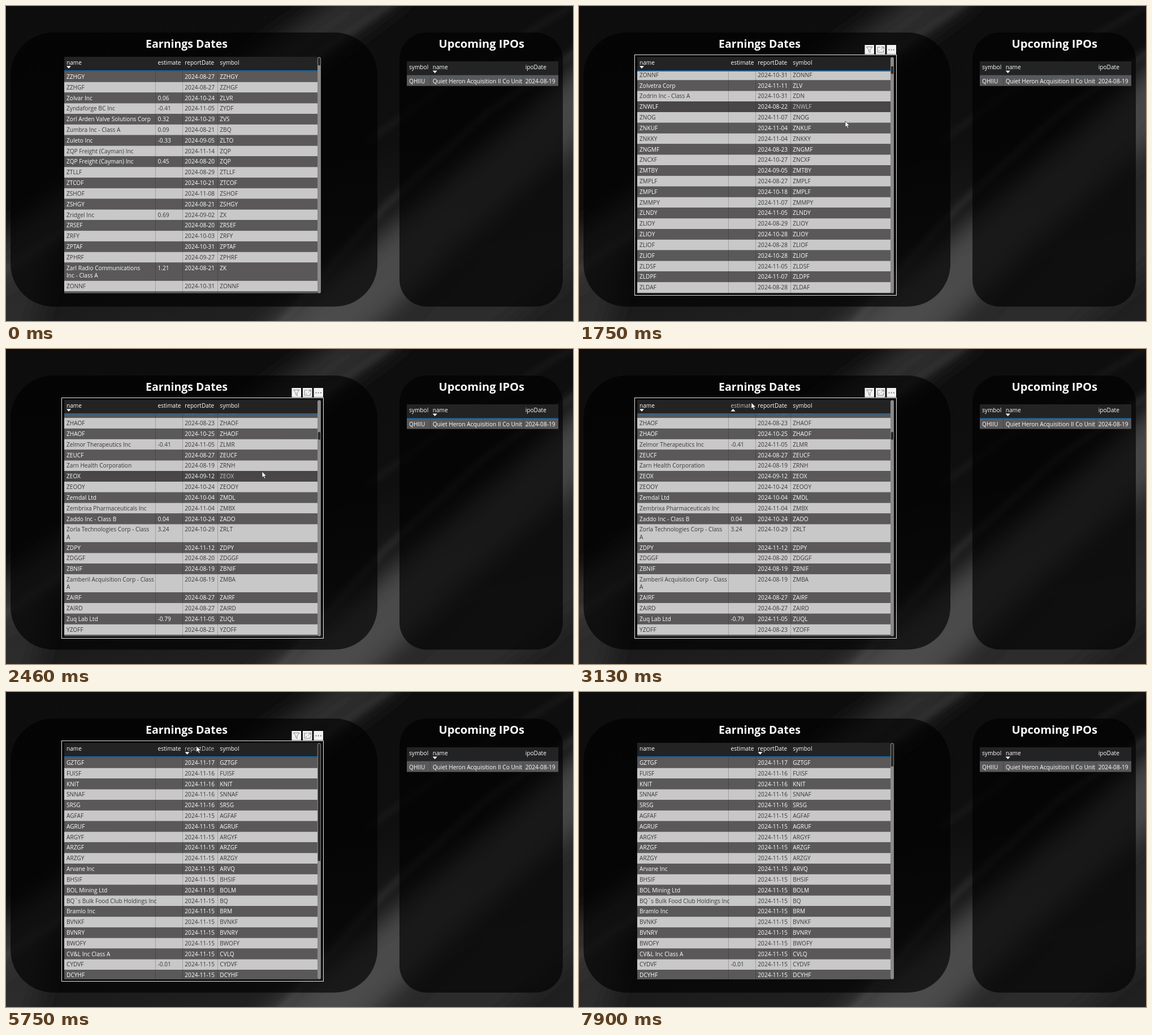
Write an HTML page that moves like this. It is 1003x558 px and loops after 8.15 s.

```html
<!DOCTYPE html>
<html lang="en">
<head>
<meta charset="utf-8">
<title>Earnings Dates</title>
<style>
html, body { margin: 0; width: 100%; height: 100%; overflow: hidden; background: #0c0c0c; }
svg { display: block; width: 1003px; height: 558px; }
text { font: 10.15px "Open Sans", "Noto Sans", sans-serif; fill: #fff; white-space: pre; }
.strong text { font-weight: 500; }
.title { font-weight: 700; text-anchor: middle; }
</style>
</head>
<body>
<svg id="stage" viewBox="0 0 1003 558" xmlns="http://www.w3.org/2000/svg">
  <defs>
    <clipPath id="body"><rect x="103" y="115.4" width="448" height="393.6"/></clipPath>
    <filter id="soft" x="-50%" y="-50%" width="200%" height="200%"><feGaussianBlur stdDeviation="20"/></filter>
    <filter id="fine" x="-50%" y="-50%" width="200%" height="200%"><feGaussianBlur stdDeviation="6"/></filter>
    <linearGradient id="base" x1="0" y1="0" x2="0.35" y2="1">
      <stop offset="0" stop-color="#0d0d0d"/>
      <stop offset="0.6" stop-color="#0f0f0f"/>
      <stop offset="1" stop-color="#202020"/>
    </linearGradient>
  </defs>
  <rect width="1003" height="558" fill="url(#base)"/>
  <g filter="url(#soft)">
    <path d="M600 -30H720L360 240L-40 520V430Z" fill="#3a3a3a" opacity=".75"/>
    <path d="M1060 60L1040 220L780 450L600 620H400L650 420L860 240Z" fill="#5a5a5a" opacity=".75"/>
    <path d="M-30 470L90 440L40 600H-30Z" fill="#3c3c3c" opacity=".5"/>
    <path d="M1040 230V440L820 620H640Z" fill="#3a3a3a" opacity=".5"/>
  </g>
  <g filter="url(#fine)" stroke="#777" fill="none">
    <path d="M1020 -12L820 110L640 240" stroke-width="5" opacity=".18"/>
    <path d="M1020 72L850 190L670 355L470 580" stroke-width="7" opacity=".3"/>
    <path d="M690 -10L500 120L260 290L-20 480" stroke-width="10" opacity=".22"/>
  </g>
  <g fill="#000" fill-opacity=".66">
    <rect x="8" y="47" width="649" height="485.5" rx="76"/>
    <rect x="696" y="47" width="289" height="485.5" rx="48"/>
  </g>
  <text class="title" x="319.5" y="74.3" style="font-size:19.5px">Earnings Dates</text>
  <text class="title" x="841.3" y="74.3" style="font-size:20.1px">Upcoming IPOs</text>
</svg>
<script>
const LOOP = 8150, PITCH = 18.82, EXTRA = 13.4, TOP = 115.8;
const COLS = [107, 268.5, 316.3, 378.3], EDGES = [103, 264.5, 312.5, 374.5, 551];
const DARK = '#5a5858', LIGHT = '#c8c8c8', DARK_OVER = '#484646', LIGHT_OVER = '#b4b4b4';
const stage = document.getElementById('stage');

function add(parent, tag, attrs, content) {
  const el = document.createElementNS('http://www.w3.org/2000/svg', tag);
  for (const k in attrs) el.setAttribute(k, attrs[k]);
  if (content !== undefined) el.textContent = content;
  parent.appendChild(el);
  return el;
}
const rect = (p, x, y, width, height, fill, more) => add(p, 'rect', { x, y, width, height, fill, ...more });
const label = (p, x, y, s) => add(p, 'text', { x, y }, s);
const show = (el, on) => el.setAttribute('display', on ? 'inline' : 'none');
const move = (el, x, y) => el.setAttribute('transform', `translate(${x} ${y})`);

let seed = 7;
const rand = n => (seed = (seed * 16807) % 2147483647) % n;
const letters = n => Array.from({ length: n }, () => 'ABCDEFGHKLMNOPRSTVWY'[rand(20)]).join('');

// Lines read "name|estimate|date|symbol", or "code|date"; ~ breaks the name.
const parse = text => text.trim().split('\n').map(line => {
  const f = line.split('|');
  return f.length === 2 ? [f[0], '', f[1], f[0]] : f;
});
function filler(count, prefix, date) {
  return Array.from({ length: count }, (_, i) => {
    const code = prefix(i) + letters(2) + 'FY'[rand(2)];
    return [code, '', date(), code];
  });
}
const pad = n => String(n).padStart(2, '0');
const anyDate = () => pad(8 + rand(4)) + '-' + pad(10 + rand(19));

const byName = [...parse(`
ZZHGY|08-27
ZZHGF|08-27
Zolvar Inc|0.06|10-24|ZLVR
Zyndaforge BC Inc|-0.41|11-05|ZYDF
Zorl Arden Valve Solutions Corp|0.32|10-29|ZVS
Zumbra Inc - Class A|0.09|08-21|ZBQ
Zuleto Inc|-0.33|09-05|ZLTO
ZQP Freight (Cayman) Inc||11-14|ZQP
ZQP Freight (Cayman) Inc|0.45|08-20|ZQP
ZTLLF|08-29
ZTCOF|10-21
ZSHOF|11-08
ZSHGY|08-21
Zridgel Inc|0.69|09-02|ZX
ZRSEF|08-20
ZRFY|10-03
ZPTAF|10-31
ZPHRF|09-27
Zarl Radio Communications~Inc - Class A|1.21|08-21|ZK
ZONNF|10-31
Zolvetra Corp||11-11|ZLV
Zodrin Inc - Class A||10-31|ZDN
ZNWLF|08-22
ZNOG|11-07
ZNKUF|11-04
ZNKKY|11-04
ZNGMF|08-23
ZNCXF|10-27
ZMTBY|09-05
ZMPLF|08-27
ZMPLF|10-18
ZMMPY|11-07
ZLNDY|11-05
ZLIOY|08-29
ZLIOY|10-28
ZLIOF|08-28
ZLIOF|10-28
ZLDSF|11-05
ZLDPF|11-07
ZLDAF|08-28`),
...filler(32, i => 'Z' + 'LKJIH'[Math.floor(i / 6.5)], anyDate),
...parse(`
ZHAOF|10-25
ZHAOF|08-23
ZHAOF|10-25
Zelmor Therapeutics Inc|-0.41|11-05|ZLMR
ZEUCF|08-27
Zarn Health Corporation||08-19|ZRNH
ZEOX|09-12
ZEOOY|10-24
Zemdal Ltd||10-04|ZMDL
Zembrixa Pharmaceuticals Inc||11-04|ZMBX
Zaddo Inc - Class B|0.04|10-24|ZADO
Zorla Technologies Corp - Class~A|3.24|10-29|ZRLT
ZDPY|11-12
ZDGGF|08-20
ZBNIF|08-19
Zamberil Acquisition Corp - Class~A||08-19|ZMBA
ZAIRF|08-27
ZAIRD|08-27
Zuq Lab Ltd|-0.79|11-05|ZUQL
YZOFF|08-23`),
...filler(3, () => 'YZ', anyDate)];

const byEstimate = parse(`
14q Helixon Inc - Class A||10-31|HXQ
139 Inc||08-29|QJ
23 Schooling & Technology~Group Inc||08-26|QS
210 Radian Capital Corp||08-19|RDNC
210 Radian Capital Corp||11-11|RDNC
240 Cell Sciences Corp||11-07|CLSQ
2-600 Garlands Inc - Class A||10-31|GRLQ
2618 Holdings LLC||11-12|QHLD
2704 Bancorp of Minnesota Inc||11-07|BMNQ
29th Meridian Group Inc||11-04|MRDQ
37Vo Holdings Inc||08-21|VOQH
418Stream Inc||11-07|STRQ
4Q Printing Corp||08-26|FQP
4Q Printing Corp||11-05|FQP
63 Chat Online Schooling Group||08-23|CHQ
9J9 Inc||10-30|NJNQ
AAALY|11-07
AABVF|09-15
AACAF|08-22
AACAY|08-22
AADEF|08-29`);

const byDateUp = filler(21, i => 'A' + 'ABCDEFGHKLMNOPRSTUVWY'[i], () => '08-19');

const byDateDown = parse(`
GZTGF|11-17
FUISF|11-16
KNIT|11-16
SNNAF|11-16
SRSG|11-16
AGFAF|11-15
AGRUF|11-15
ARGYF|11-15
ARZGF|11-15
ARZGY|11-15
Arvane Inc||11-15|ARVQ
BHSIF|11-15
BOL Mining Ltd||11-15|BOLM
BQ\`s Bulk Food Club Holdings Inc||11-15|BQ
Bramlo Inc||11-15|BRM
BVNKF|11-15
BVNRY|11-15
BWOFY|11-15
CV&L Inc Class A||11-15|CVLQ
CYDVF|-0.01|11-15|CYDVF
DCYHF|11-15`);

function buildRows(parent, data) {
  const g = add(parent, 'g', {});
  let y = TOP;
  const rows = data.map(([name, est, date, symbol], i) => {
    const lines = name.split('~'), h = PITCH + (lines.length - 1) * EXTRA, dark = i % 2 === 0;
    const line = add(g, 'g', { class: dark ? 'strong' : '' });
    const bg = rect(line, 103, y, 448, h + 0.1, dark ? DARK : LIGHT);
    const ink = dark ? '#fff' : '#383838';
    const cells = [lines[0], est, '2024-' + date, symbol].map((s, c) => label(line, COLS[c], y + 13.1, s));
    if (lines[1]) cells.push(label(line, COLS[0], y + 13.1 + EXTRA, lines[1]));
    cells.forEach(c => c.style.fill = ink);
    const row = { y, h, dark, bg, cells, ink };
    y += h;
    return row;
  });
  for (const x of EDGES.slice(1, 4)) rect(g, x - 0.5, TOP, 1, y - TOP, '#000', { opacity: 0.2 });
  return { g, rows };
}

// Earnings table
const bodyClip = add(stage, 'g', { 'clip-path': 'url(#body)' });
const views = [byName, byEstimate, byDateUp, byDateDown].map(d => buildRows(bodyClip, d));
rect(stage, 103, 90, 448, 24.4, '#232323');
rect(stage, 103, 114, 448, 1.8, '#1d6cae');
const heads = ['name', 'estimate', 'reportDate', 'symbol'].map((s, i) => label(stage, COLS[i], 103.6, s));
rect(stage, 551, 90.5, 6, 418.5, '#8a8a8a', { rx: 3 });
const thumb = rect(stage, 551.3, 91, 5.4, 15, '#2a2a2a', { rx: 2.7, stroke: '#a5a5a5', 'stroke-width': 0.7 });
const arrow = (x, y, up) => add(stage, 'path', { fill: '#fff', d: up ? `M${x} ${y + 4.5}h8l-4 -4.5z` : `M${x} ${y}h8l-4 4.5z` });
const nameDown = arrow(107, 106.2, false), estUp = arrow(268.5, 106, true);
const dateUp = arrow(316.5, 106, true), dateDown = arrow(316.5, 106.2, false);

// IPO table
const ipo = add(stage, 'g', {});
rect(ipo, 709, 98, 268, 25, '#232323');
rect(ipo, 709, 122.6, 268, 1.4, '#1d6cae');
const ipoRow = rect(ipo, 709, 124, 268, 17.6, DARK);
for (const x of [750, 914.5]) rect(ipo, x, 124, 1, 17.6, '#000', { opacity: 0.2 });
const IPO_X = [713, 754.7, 918.7];
['symbol', 'name', 'ipoDate'].forEach((s, i) => label(ipo, IPO_X[i], 111.6, s));
const ipoCells = ['QHIIU', 'Quiet Heron Acquisition II Co Unit', '2024-08-19'].map((s, i) => label(ipo, IPO_X[i], 136.7, s));
arrow(754.7, 114.6, false);

function buildFrame(x, y, w, h) {
  const g = add(stage, 'g', {});
  rect(g, x + 0.5, y + 0.5, w, h, 'none', { stroke: '#e8e8e8' });
  [0, 19.5, 39].forEach((dx, i) => {
    const b = add(g, 'g', { fill: 'none', stroke: '#777', 'stroke-width': 0.9 });
    move(b, x + w - 55.5 + dx, y - 17);
    rect(b, 0, 0, 16.5, 16.5, '#f2f2f2', { stroke: 'none' });
    if (i === 0) add(b, 'path', { d: 'M3 3.5h10.5l-4 5v5l-2.5 -1.8v-3.2z' });
    if (i === 1) add(b, 'path', { d: 'M8 4H3v9h10.5V9M9.5 3.5h4.5v4M14 3.5l-5 5M5 11l2-2' });
    if (i === 2) for (const cx of [4, 8.2, 12.4]) add(b, 'circle', { cx, cy: 8.5, r: 0.9, fill: '#555', stroke: 'none' });
  });
  return { g, holds: (px, py) => px >= x && px <= x + w && py >= y && py <= y + h };
}
const leftFrame = buildFrame(98, 86, 463, 426);
const rightFrame = buildFrame(705, 94.5, 276, 408.5);
const cursor = add(stage, 'path', { d: 'M0 0V10.8L2.5 8.5L4.2 12.6L6 11.8L4.3 7.9H7.7Z', fill: '#fff', stroke: '#222', 'stroke-width': 0.7 });

// Keys are [time, value, ...]
function at(keys, t) {
  const i = keys.findIndex(k => k[0] > t);
  if (i === 0) return keys[0].slice(1);
  if (i < 0) return keys[keys.length - 1].slice(1);
  const a = keys[i - 1], b = keys[i], u = (t - a[0]) / (b[0] - a[0]);
  return a.slice(1).map((v, j) => v + (b[j + 1] - v) * u);
}
const SCROLL = [[1150, 0], [1200, 4], [1400, 130], [1750, 373], [2000, 640], [2400, 1381]];
const POINTER = [
  [200, 780, 480], [300, 690, 360], [450, 540, 260], [600, 500, 205], [750, 498, 200],
  [1000, 479, 167], [1200, 479, 167], [1750, 471, 204], [2460, 453, 217], [2560, 453, 217],
  [2820, 292, 92], [3130, 305, 95], [3700, 305, 95], [4080, 338, 98], [4230, 341, 102],
  [5240, 341, 102], [5350, 336, 96], [5750, 336, 96], [6050, 600, 34], [6450, 827, 124],
  [6600, 827, 124], [6900, 600, 34], [7150, 500, 250], [7350, 540, 545]
];
const pages = (t, start) => 2 + Math.max(0, Math.floor((t - start) / 250));

let lit = null;
function hover(row, col) {
  if (lit) {
    lit.bg.setAttribute('fill', lit.dark ? DARK : LIGHT);
    lit.cells.forEach(c => c.style.fill = lit.ink);
  }
  lit = row;
  if (!row) return;
  row.bg.setAttribute('fill', row.dark ? DARK_OVER : LIGHT_OVER);
  if (row.cells[col]) row.cells[col].style.fill = row.dark ? '#c4c4c4' : '#4c4c4c';
}

function draw(t) {
  const view = t < 3520 ? 0 : t < 4790 ? 1 : t < 5750 ? 2 : 3;
  const scroll = view ? 0 : at(SCROLL, t)[0];
  views.forEach((v, i) => show(v.g, i === view));
  move(views[view].g, 0, -scroll);

  const starts = [0, 3730, 4790, 5900];
  thumb.setAttribute('y', 91 + scroll * 0.04);
  thumb.setAttribute('height', view ? 418 / pages(t, starts[view]) : 15);

  const here = t >= 200 && t < 7380, [x, y] = at(POINTER, t);
  show(cursor, here);
  move(cursor, x, y);
  const inLeft = here && leftFrame.holds(x, y), inRight = here && rightFrame.holds(x, y);
  show(leftFrame.g, inLeft);
  show(rightFrame.g, inRight);

  // The highlight trails the scroll a little.
  const cy = y + (view ? 0 : at(SCROLL, t - 40)[0]);
  const col = EDGES.findIndex((e, i) => x >= e && x < EDGES[i + 1]);
  const row = inLeft && y > TOP && col >= 0 && views[view].rows.find(r => cy >= r.y && cy < r.y + r.h);
  hover(row || null, col);

  const overIpo = inRight && y >= 123 && y < 141.6;
  ipoRow.setAttribute('fill', overIpo ? DARK_OVER : DARK);
  ipoCells.forEach((c, i) => {
    c.style.fill = overIpo && x >= IPO_X[i] - 4 && x < (IPO_X[i + 1] || 981) - 4 ? '#c4c4c4' : '#fff';
  });

  const onHead = inLeft && y >= 90 && y < 114 ? col : -1;
  heads.forEach((h, i) => h.style.fill = i === onHead ? '#c4c4c4' : '#fff');
  show(nameDown, view === 0);
  show(estUp, view === 1 || onHead === 1);
  show(dateUp, view === 2 || (view < 2 && onHead === 2));
  show(dateDown, view === 3);
}

function tick() {
  draw(performance.now() % LOOP);
  requestAnimationFrame(tick);
}
tick();
</script>
</body>
</html>
```
